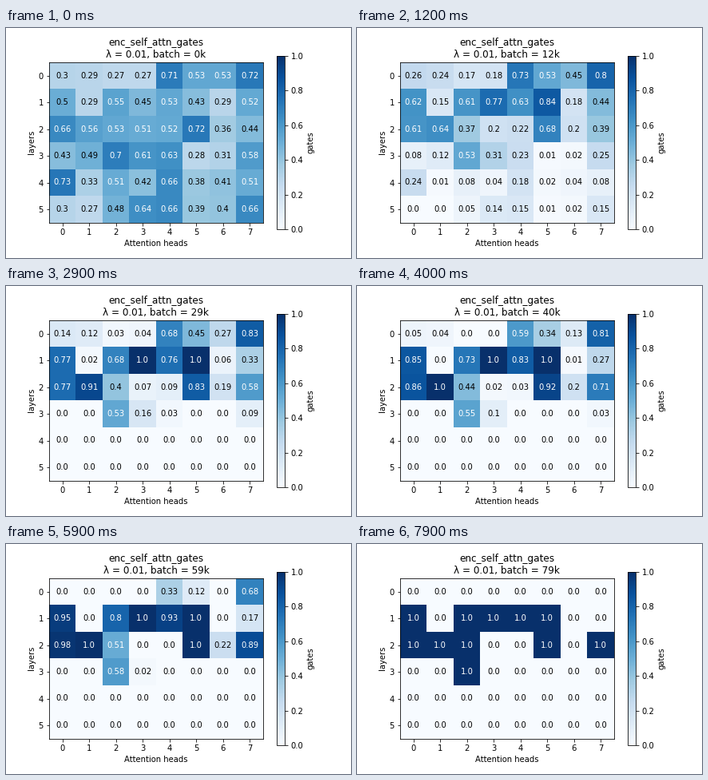
A matplotlib script that plays this animation: 432x288 px, repeating every 8000 ms.

```python
import numpy as np
import matplotlib.pyplot as plt
from matplotlib.animation import FuncAnimation

STEPS = 80       # one step per thousand batches
HARDEN_AT = 70   # from here on gates are either open or closed
DIP = .78        # early push towards closing in the deeper layers
DIP_TIME = 6
WEAR = 6e-4      # growing push towards closing in the first layer


def openness(logit):
    """Hard concrete gate: a stretched sigmoid, clipped to 0..1."""
    return np.clip(1.2 / (1 + np.exp(-logit)) - .1, 0, 1)


def logit_of(gate):
    p = (gate + .1) / 1.2
    return np.log(p / (1 - p))


# Gates before training, in percent: layers by heads.
start = np.array([
    [30, 29, 27, 27, 71, 53, 53, 72],
    [50, 29, 55, 45, 53, 43, 29, 52],
    [66, 56, 53, 51, 52, 72, 36, 44],
    [43, 49, 70, 61, 63, 28, 31, 58],
    [73, 33, 51, 42, 66, 38, 41, 51],
    [30, 27, 48, 64, 66, 39, 40, 66],
]) / 100

# Steady drift of each logit per thousand steps; the last layers just fade.
drift = np.empty(start.shape)
drift[0] = -7, -9, -28, -25, 13, 8, -14, 33
drift[1] = 33, -51, 16, 93, 29, 125, -40, -22
drift[2] = 41, 78, 12, -37, -34, 43, 4, 43
drift[3] = -70, -66, 6, -30, -62, -75, -75, -40
drift[4] = -90
drift[5] = -100


def gates_at(step):
    logit = logit_of(start) + drift * step / 1000
    logit[0] -= WEAR * step**2
    logit[2:] -= DIP * (1 - np.exp(-step / DIP_TIME))
    gates = openness(logit).round(2)
    return (logit > 0).astype(float) if step >= HARDEN_AT else gates


fig, ax = plt.subplots(figsize=(6, 4), dpi=72)
fig.subplots_adjust(left=.125, right=.9, bottom=.125, top=.88)
im = ax.imshow(start, cmap="Blues", vmin=0, vmax=1)
fig.colorbar(im, ax=ax, label="gates")
layers, heads = start.shape
ax.set_xticks(range(heads))
ax.set_yticks(range(layers))
ax.set_xlabel("Attention heads")
ax.set_ylabel("layers")
title = ax.set_title("")
labels = {(y, x): ax.text(x, y, "", ha="center", va="center")
          for y, x in np.ndindex(layers, heads)}


def draw(step):
    gates = gates_at(step)
    im.set_data(gates)
    title.set_text(f"enc_self_attn_gates\nλ = 0.01, batch = {step}k")
    for cell, label in labels.items():
        value = float(gates[cell])
        label.set_text(str(value))
        label.set_color("white" if value > .5 else "black")
    return [im, title, *labels.values()]


anim = FuncAnimation(fig, draw, frames=STEPS, interval=100,
                     repeat=True, repeat_delay=0, blit=False)
plt.show()
```
